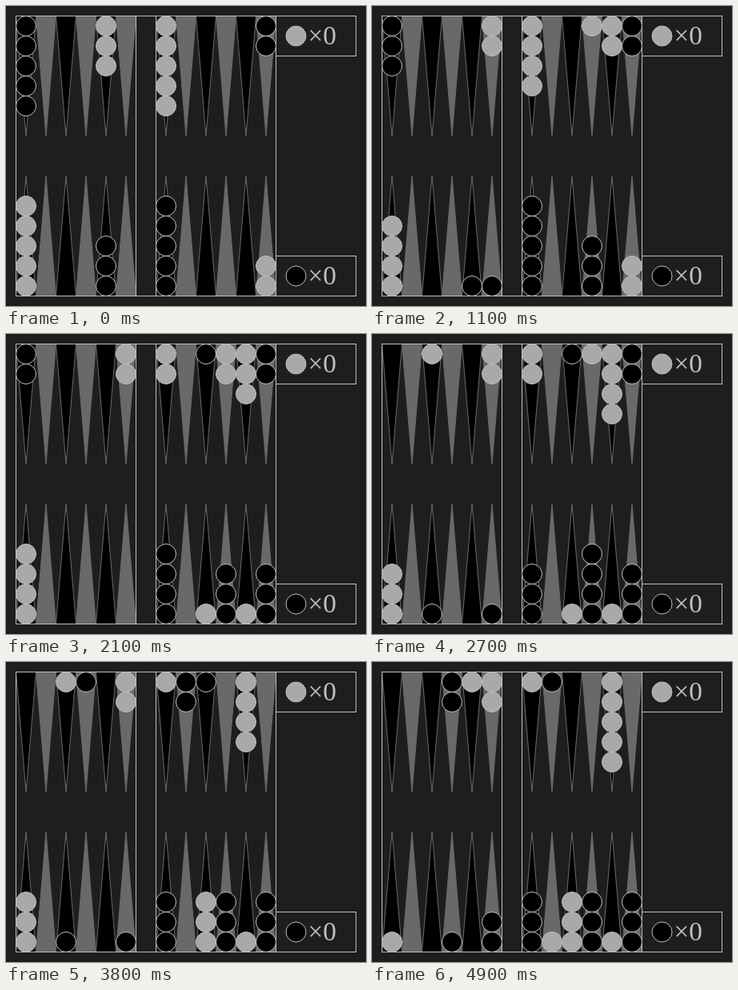
Animation of 450x375 px, one loop 5000 ms. Source, as an HTML page with a canvas:

```html
<!DOCTYPE html>
<html>
<head>
<meta charset="utf-8">
<style>
html, body { margin: 0; overflow: hidden; background: #1e1e1e; }
canvas { display: block; }
</style>
</head>
<body>
<canvas id="stage" width="450" height="375"></canvas>
<script>
const ctx = document.getElementById("stage").getContext("2d");
const CELL = 25, STEP_MS = 100;
const LIGHT = "#a9a9a9", DARK = "#000", LINE = "#c0c0c0", DIM = "#696969";

// Points run 1-12 along the bottom from the right, 13-24 along the top from the left.
// Light moves up and enters from 0; dark moves down and enters from 25.
const START = { 1: 2, 12: 5, 17: 3, 19: 5 };
const MOVES = `12/18 17/18 8/3 8/7 17/22 19/23 8/3 13/8 13/8 8/3 17/23 1/4
  8/2 13/7 7/1 7/1 0/2 19/23 25/21 6/1 19/22 22/23 13/7 6/3 12/14 14/15
  13/10 24/22 0/4 19/20 22/20 3/2 pass 24/22 22/16 0/2 0/4 25/20 21/15
  0/2 12/17 15/10 10/7 12/17 2/5 20/16 10/9 17/21 21/23`.split(/\s+/);

// Positive counts are light checkers, negative counts dark ones.
function play(board, move) {
  const next = [...board];
  if (move === "pass") return next;
  const [from, to] = move.split("/").map(Number);
  const side = Math.sign(to - from);
  next[from] -= side;
  if (next[to] === -side) {
    next[side > 0 ? 25 : 0] -= side;
    next[to] = 0;
  }
  next[to] += side;
  return next;
}

const opening = Array(26).fill(0);
for (const point in START) {
  opening[point] = START[point];
  opening[25 - point] = -START[point];
}
const boards = [opening];
for (const move of MOVES) boards.push(play(boards[boards.length - 1], move));

function columnX(column) {
  return CELL * (column + (column > 5 ? 2 : 1));
}

function checker(x, y, light) {
  ctx.beginPath();
  ctx.arc(x, y, CELL / 2, 0, 2 * Math.PI);
  ctx.fillStyle = light ? LIGHT : DARK;
  ctx.fill();
  ctx.stroke();
}

function triangle(x, base, tip, color) {
  ctx.beginPath();
  ctx.moveTo(x - CELL / 2, base);
  ctx.lineTo(x, tip);
  ctx.lineTo(x + CELL / 2, base);
  ctx.closePath();
  ctx.fillStyle = color;
  ctx.fill();
  ctx.stroke();
}

function drawTable() {
  ctx.fillStyle = "#1e1e1e";
  ctx.fillRect(0, 0, 450, 375);
  ctx.lineWidth = 1;
  ctx.strokeStyle = DIM;
  for (let column = 0; column < 12; column++) {
    const color = column % 2 ? DIM : DARK;
    triangle(columnX(column), 12.5, 162.5, color);
    triangle(columnX(column), 362.5, 212.5, color);
  }
  ctx.strokeStyle = LINE;
  ctx.strokeRect(12.5, 12.5, 325, 350);
  ctx.strokeRect(162.5, 12.5, 25, 350);
  ctx.font = "33.33px 'Liberation Serif', serif";
  for (const [y, light] of [[12.5, true], [312.5, false]]) {
    ctx.strokeRect(337.5, y, 100, 50);
    checker(362.5, y + 25, light);
    ctx.fillStyle = LINE;
    ctx.fillText("×0", 377.5, y + 35);
  }
}

function drawStack(point, count) {
  let x, y, step;
  if (point % 25 === 0) {
    x = 175;
    y = point ? 175 : 200;
    step = point ? -CELL : CELL;
  } else {
    const top = point > 12;
    x = columnX(top ? point - 13 : 12 - point);
    y = top ? 25 : 350;
    step = top ? CELL : -CELL;
  }
  for (let i = 0; i < Math.abs(count); i++) checker(x, y + i * step, count > 0);
}

function render() {
  const step = Math.floor(performance.now() / STEP_MS) % boards.length;
  drawTable();
  boards[step].forEach((count, point) => drawStack(point, count));
  requestAnimationFrame(render);
}
render();
</script>
</body>
</html>
```
